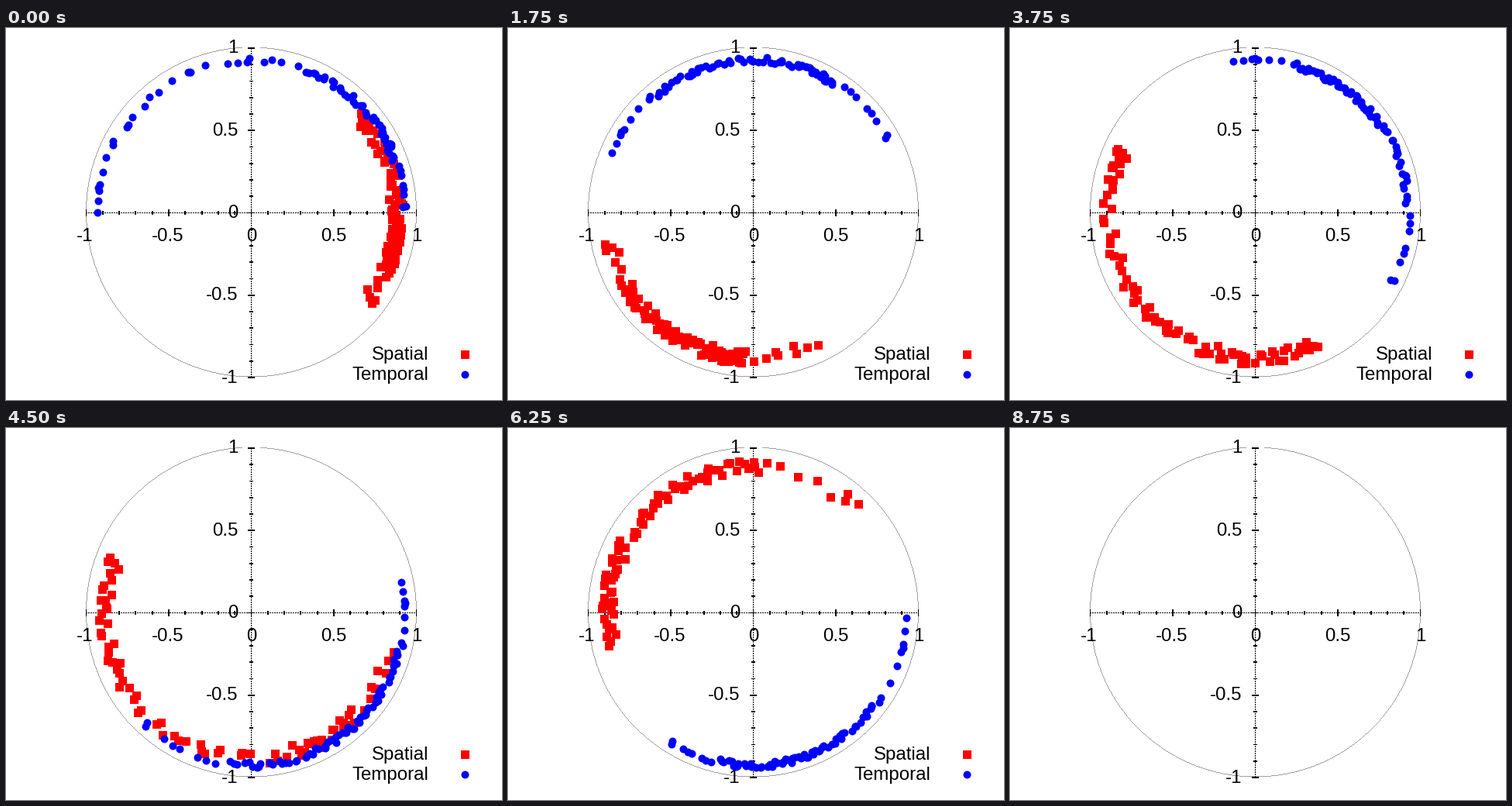
Animation of 640 by 480 pixels, one loop 9000 ms. Source, as a matplotlib script:

```python
import matplotlib.pyplot as plt
import numpy as np
from matplotlib.animation import FuncAnimation

W, H, DPI = 640, 480, 100
PX = 72 / DPI                      # one pixel in points
CX, CY, RX, RY = 316, 238, 213, 212.5
FRAMES, STEP_MS = 36, 250
COUNT = 80
EM = 24
SHARES = (0, 0.1, 0.35, 0.65, 0.9, 1)   # shares of a swarm up to each key angle

plt.rcParams["font.family"] = "Liberation Sans"
fig = plt.figure(figsize=(W / DPI, H / DPI), dpi=DPI, facecolor="white")
ax = fig.add_axes([0, 0, 1, 1])
ax.set_xlim(0, W)
ax.set_ylim(H, 0)
ax.axis("off")


def stroke(x0, y0, x1, y1, dash="-"):
    """One-pixel line through pixel centres."""
    ax.plot([x0 + 0.5, x1 + 0.5], [y0 + 0.5, y1 + 0.5], color="black", lw=PX,
            ls=dash, antialiased=False, snap=False, solid_capstyle="butt",
            dash_capstyle="butt", zorder=1)


def label(x, y, text, ha="left"):
    return ax.text(x, y, text, ha=ha, va="baseline", fontsize=EM * PX, zorder=2)


def advance(number):
    return EM * sum({"-": 0.333, ".": 0.278}.get(c, 0.556) for c in number)


def markers(shape, size, color, z):
    return ax.plot([], [], ls="", marker=shape, ms=size * PX, mew=0,
                   color=color, antialiased=False, zorder=z)[0]


def draw_ring():
    """Thin circle, one pixel per column or row, open at the very top."""
    d = np.arange(-151, 152)
    e = np.sqrt(1 - (d / RX) ** 2)
    top = np.abs(d) > 11
    xs = np.concatenate([d[top], d, RX * e, -RX * e])
    ys = np.concatenate([-RY * e[top], RY * e, d, d])
    ax.plot(CX + np.round(xs), CY + np.round(ys), ls="", marker=",",
            color="#a0a0a0", zorder=0)


def draw_axes():
    dots = (0, (2, 2))
    stroke(CX - RX, CY, CX + RX, CY, dots)
    stroke(CX, CY + RY, CX, CY - RY, dots)
    for i in range(-10, 11):
        major = i % 5 == 0
        size = 4.5 if major else 2.5
        x, y = CX + RX * i / 10, CY - RY * i / 10
        stroke(x, CY - size, x, CY + size)
        stroke(CX - size, y, CX + size, y)
        if major:
            text = f"{i / 10:g}"
            wide = advance(text)
            shift = -1 if i < 0 else 0.5
            label(x + shift - wide / 2, 275, text)
            label(299 - wide, y + 7, text)


class Swarm:
    """Points on a circle, spread by rank and carried round at a steady rate."""

    def __init__(self, dots, radius, spread, rate, seed):
        rng = np.random.default_rng(seed)
        self.dots, self.rate = dots, rate
        self.r = radius + spread * rng.uniform(-1.7, 1.7, COUNT)
        rank = np.linspace(0, 1, COUNT) + rng.normal(0, 0.007, COUNT)
        self.rank = np.clip(rank, 0, 1)
        self.times, self.poses = [], []

    def key(self, time, *angles):
        """Pose at a time; the drift rate decides how many turns were made."""
        pose = np.array(angles, float)
        if self.poses:
            ahead = self.poses[-1] + self.rate * (time - self.times[-1])
            pose += 360 * np.round((ahead.mean() - pose.mean()) / 360)
        self.times.append(time)
        self.poses.append(pose)

    def move(self, t):
        pose = np.array([np.interp(t, self.times, a) for a in zip(*self.poses)])
        pose += self.rate * max(0, t - self.times[-1])
        phase = np.radians(np.interp(self.rank, SHARES, pose))
        self.dots.set_data(CX + RX * self.r * np.cos(phase),
                           CY - RY * self.r * np.sin(phase))


draw_ring()
draw_axes()

square, disc = ("s", 11, "red", 3), ("o", 10, "blue", 4)
legend = []
for kind, name, y in ((square, "Spatial", 421), (disc, "Temporal", 447)):
    mark = markers(*kind)
    mark.set_data([592], [y])
    legend += [mark, label(545, y + 7, name, "right")]

spatial = Swarm(markers(*square), 0.88, 0.025, 138, 4)
spatial.key(0, -37, -23, -11, 5, 31, 42)
spatial.key(7, 192, 210, 231, 253, 267, 296)
spatial.key(15, 155, 163, 210, 254, 284, 295)
spatial.key(21, -198, -179, -150, -40, -12, 34)
spatial.key(25, 46, 87, 116, 157, 181, 193)
spatial.key(31, -90, -71, -58, -40, -4, 36)

temporal = Swarm(markers(*disc), 0.927, 0.01, -150, 9)
temporal.key(0, 1, 20, 38, 69, 152, 180)
temporal.key(7, 28, 58, 73, 107, 131, 157)
temporal.key(15, -28, 3, 34, 57, 74, 98)
temporal.key(21, 118, 160, 193, 225, 260, 285)
temporal.key(25, -123, -103, -83, -62, -36, -2)
temporal.key(31, -21, 5, 60, 74, 98, 129)

swarms = (spatial, temporal)
shown = legend + [s.dots for s in swarms]


def draw(t):
    for item in shown:
        item.set_visible(t < FRAMES - 1)
    for swarm in swarms:
        swarm.move(t)
    return shown


anim = FuncAnimation(fig, draw, frames=FRAMES, interval=STEP_MS,
                     repeat=True, repeat_delay=0, blit=False)
plt.show()
```
